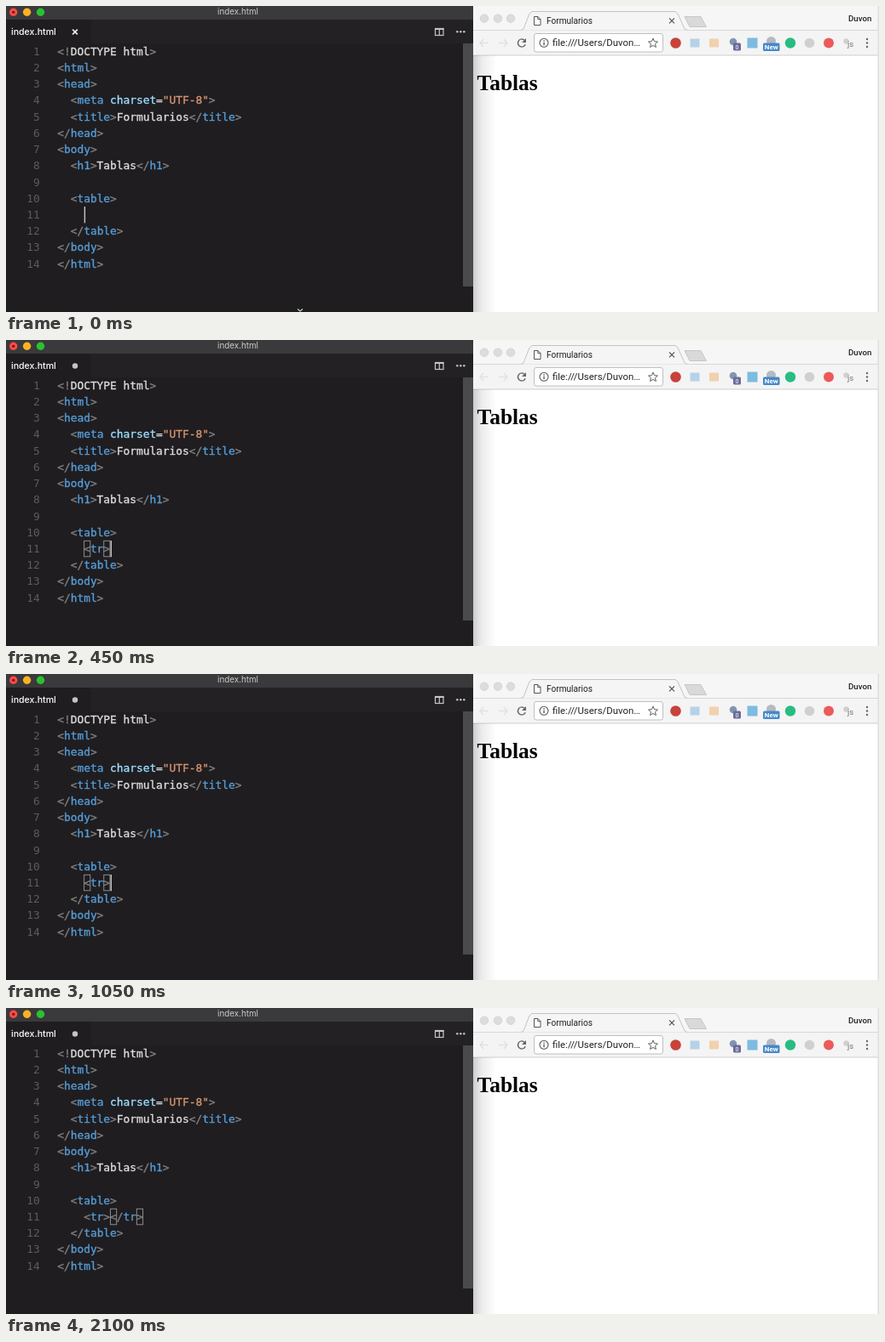
Recreate the animation shown at these times as an HTML page with a canvas. Size 1024x360 px, loop 2.2 s.

```html
<!DOCTYPE html>
<html lang="es">
<head>
<meta charset="UTF-8">
<title>Tablas</title>
<style>
html, body { margin: 0; width: 100%; height: 100%; overflow: hidden; background: #1f1d20; }
canvas { display: block; width: 1024px; height: 360px; }
</style>
</head>
<body>
<canvas id="stage"></canvas>
<script>
const W = 1024, H = 360, LOOP = 2200;
const canvas = document.getElementById('stage');
const ctx = canvas.getContext('2d');
const dpr = window.devicePixelRatio || 1;
canvas.width = W * dpr;
canvas.height = H * dpr;

const MONO = '12.83px "DejaVu Sans Mono", monospace';
const CODE_X = 60.3, CELL = 7.72, ROW = 19.23, FIRST_ROW = 53;
const C = {
  editor: '#1f1d20', bar: '#232124', title: '#3a393b', text: '#dcdcdc',
  bracket: '#808080', tag: '#569cd6', attr: '#9cdcfe', string: '#d3936f',
  number: '#5c5b5d', popup: '#2b292c', chosen: '#073253', ink: '#222222'
};

const LINES = [
  '<!DOCTYPE html>', '<html>', '<head>', '  <meta charset="UTF-8">',
  '  <title>Formularios</title>', '</head>', '<body>', '  <h1>Tablas</h1>',
  '', '  <table>', '', '  </table>', '</body>', '</html>'
];
const EDIT = 10;

const TAGS = ['a', 'abbr', 'address', 'area', 'article'];
// Each step holds until the next one starts.
const STEPS = [
  { at: 0, typed: '', caret: true },
  { at: 100, typed: '<', caret: true, list: ['/table', ...TAGS] },
  { at: 200, typed: '<t', caret: true },
  { at: 250, typed: '<tr', caret: true, list: ['tr', 'track', 'textarea'], match: 'tr',
    note: 'The tr element represents a row of cells in a table.' },
  { at: 400, typed: '<tr>', caret: true, pair: [4, 7] },
  { at: 1200, typed: '<tr><', caret: true },
  { at: 1250, typed: '<tr><', caret: true, list: ['/tr', ...TAGS] },
  { at: 1550, typed: '<tr></tr>', pair: [8, 12] }
];

const colX = col => CODE_X + col * CELL;
const rowY = row => FIRST_ROW + row * ROW;

function rect(x, y, w, h, fill) {
  ctx.fillStyle = fill;
  ctx.fillRect(x, y, w, h);
}

function disc(x, y, r, fill) {
  ctx.fillStyle = fill;
  ctx.beginPath();
  ctx.arc(x, y, r, 0, Math.PI * 2);
  ctx.fill();
}

function ring(x, y, r, color, width = 1) {
  ctx.strokeStyle = color;
  ctx.lineWidth = width;
  ctx.beginPath();
  ctx.arc(x, y, r, 0, Math.PI * 2);
  ctx.stroke();
}

function box(x, y, w, h, color, width = 1) {
  ctx.strokeStyle = color;
  ctx.lineWidth = width;
  ctx.strokeRect(x, y, w, h);
}

function trace(points, closed) {
  ctx.beginPath();
  points.forEach(([x, y]) => ctx.lineTo(x, y));
  if (closed) ctx.closePath();
}

function line(points, color, width = 1) {
  ctx.strokeStyle = color;
  ctx.lineWidth = width;
  trace(points);
  ctx.stroke();
}

function shape(points, fill, stroke) {
  trace(points, true);
  if (fill) { ctx.fillStyle = fill; ctx.fill(); }
  if (stroke) { ctx.strokeStyle = stroke; ctx.lineWidth = 1; ctx.stroke(); }
}

function rounded(x, y, w, h, r, fill, stroke) {
  ctx.beginPath();
  ctx.roundRect(x, y, w, h, r);
  if (fill) { ctx.fillStyle = fill; ctx.fill(); }
  if (stroke) { ctx.strokeStyle = stroke; ctx.lineWidth = 1; ctx.stroke(); }
}

function label(str, x, y, font, color, align = 'left') {
  ctx.font = font;
  ctx.fillStyle = color;
  ctx.textAlign = align;
  ctx.fillText(str, x, y);
}

// Code glyphs get a hairline outline for a slightly heavier weight.
function code(str, x, y, color) {
  label(str, x, y, MONO, color);
  ctx.strokeStyle = color;
  ctx.lineWidth = 0.35;
  ctx.strokeText(str, x, y);
}

function cross(x, y, r, color, width) {
  line([[x - r, y - r], [x + r, y + r]], color, width);
  line([[x - r, y + r], [x + r, y - r]], color, width);
}

function codeLine(str, y) {
  const parts = /(<!|<\/?(?=\w)|>)|("[^"]*")|(charset)|((?<=<\/?)\w+)|./g;
  for (const m of str.matchAll(parts)) {
    const color = m[1] ? C.bracket : m[2] ? C.string : m[3] ? C.attr : m[4] ? C.tag : C.text;
    code(m[0], colX(m.index), y, color);
  }
}

function wrench(x, y) {
  ctx.lineCap = 'round';
  line([[x - 5, y + 4.5], [x + 1.5, y - 1]], '#c5c5c5', 3);
  ctx.lineCap = 'butt';
  ctx.strokeStyle = '#c5c5c5';
  ctx.lineWidth = 2.4;
  ctx.beginPath();
  ctx.arc(x + 3, y - 2.3, 2.9, -0.1, Math.PI * 1.6);
  ctx.stroke();
}

function popup(step, left) {
  const { list, note, match = '' } = step;
  const top = 256, width = 352;
  const height = (list.length + (note ? 1 : 0)) * ROW + 1;
  rect(left, top, width, height, C.popup);
  rect(left, top, width, note ? 38.5 : 19.5, C.chosen);
  box(left + 0.5, top - 0.5, width - 1, height, '#39373b');
  list.forEach((word, i) => {
    const y = 266 + (i + (note && i ? 1 : 0)) * ROW;
    wrench(left + 11, y);
    let k = 0;
    [...word].forEach((ch, j) => {
      const hit = ch === match[k];
      if (hit) k++;
      code(ch, left + 21.5 + j * CELL, y + 4.5, hit ? '#2f94dc' : C.text);
    });
  });
  if (note) {
    label(note, left + 22, 289.9, '500 12.6px Inter, sans-serif', '#c9d2d9');
    disc(left + 334, 285.5, 5, '#326f9c');
    rect(left + 333.4, 284.5, 1.3, 4, '#a9c4d6');
    rect(left + 333.4, 282, 1.3, 1.4, '#a9c4d6');
  }
}

function editor(step, t) {
  rect(0, 0, 548, H, C.editor);
  rect(0, 0, 548, 16, C.title);
  rect(0, 16, 548, 28, C.bar);
  rect(0, 16, 100, 28, C.editor);
  ['#fb4a48', '#fdb224', '#29c231'].forEach((c, i) => disc(8.7 + i * 15.9, 7.2, 4.7, c));
  disc(8.7, 7.2, 1.5, '#6e0d0b');
  label('index.html', 272, 10.3, '9.8px Inter, sans-serif', '#cccccc', 'center');
  label('index.html', 6, 34, '500 10.6px Inter, sans-serif', '#ffffff');
  if (step.typed) disc(81, 30.5, 3.2, '#c4c4c4');
  else cross(81, 30.5, 2.9, '#ededed', 1.6);

  box(503.5, 26.5, 9.5, 8, '#c5c5c5', 1.2);
  rect(503, 26, 10.5, 2, '#c5c5c5');
  rect(507.7, 27, 1.2, 8, '#c5c5c5');
  [529.3, 533.3, 537.3].forEach(x => disc(x, 30.3, 1.2, '#c5c5c5'));
  rect(536, 44, 12, 286, '#4a494b');

  LINES.forEach((str, i) => {
    const y = rowY(i) + 4.7;
    label(i + 1, 39.7, y, MONO, C.number, 'right');
    codeLine(i === EDIT ? '    ' + step.typed : str, y);
  });

  const y = rowY(EDIT);
  (step.pair || []).forEach(col => box(colX(col) + 0.4, y - 9, CELL - 0.5, 18.5, '#8c8c8c'));
  const end = colX(4 + step.typed.length);
  if (step.caret) rect(end + 0.5, y - 9.3, 1.4, 19.3, '#c8c8c8');
  if (step.list) popup(step, Math.round(end - 0.5));
  if (t < 100) line([[342, 356.5], [345, 359], [348, 356.5]], '#d0d0d0', 1.2);
}

function star(x, y, r) {
  const points = Array.from({ length: 10 }, (_, i) => {
    const a = -Math.PI / 2 + i * Math.PI / 5, d = i % 2 ? r * 0.45 : r;
    return [x + d * Math.cos(a), y + d * Math.sin(a)];
  });
  shape(points, null, '#606060');
}

function arrow(x, y, dir) {
  line([[x - 5 * dir, y], [x + 5 * dir, y]], '#e0e0e0', 1.4);
  line([[x + dir, y - 4.5], [x + 5 * dir, y], [x + dir, y + 4.5]], '#e0e0e0', 1.4);
}

function extensions() {
  const y = 43.5;
  disc(785.5, y, 6.3, '#c94239');
  rect(802.5, 38.5, 11, 10, '#b5d2e8');
  rect(825, 38.5, 11, 10, '#f3d0ae');
  disc(853, 42, 4.3, '#8195b0');
  rounded(853, 43.5, 9, 9, 1.5, '#6d6a9c');
  label('0', 857.5, 50.8, '7px Roboto, sans-serif', '#ffffff', 'center');
  rect(869.5, 37.5, 12, 12, '#7dbbe0');
  disc(897.5, 41.5, 5.5, '#b4bac0');
  rounded(888, 43.5, 19.5, 9.5, 1.5, '#4688c8');
  label('New', 897.7, 51.2, 'bold 8px Roboto, sans-serif', '#ffffff', 'center');
  disc(920, y, 6.2, '#27bd82');
  disc(942.5, y, 5.8, '#d0d0d0');
  disc(965, y, 6, '#ec5a5a');
  disc(985.5, 41.5, 3.2, '#d0d0d0');
  label('js', 987, 48, '9.5px Roboto, sans-serif', '#777777');
  [39, 43.5, 48].forEach(cy => disc(1010, cy, 1.2, '#666666'));
}

function browser() {
  rect(548, 0, 476, H, '#ffffff');
  rect(548, 0, 476, 29, '#f6f6f6');
  rect(548, 28, 476, 30, '#f4f4f4');
  rect(548, 28, 476, 1, '#d8d8d8');
  [561, 577, 592].forEach(x => {
    disc(x, 14.7, 4.8, '#dcdcdc');
    ring(x, 14.7, 4.8, '#cfcfcf', 0.7);
  });

  const tab = [[604, 28.5], [607, 27], [614, 9], [617, 6.5], [785, 6.5], [788, 9], [796, 27], [799, 28.5]];
  shape(tab, '#f5f5f5');
  line(tab, '#c4c4c4');
  shape([[796, 12.5], [815, 12.5], [821.5, 24.5], [802, 24.5]], '#d9d9d9', '#c6c6c6');
  shape([[619.5, 12.5], [624, 12.5], [627, 15.5], [627, 22.5], [619.5, 22.5]], '#ffffff', '#555555');
  line([[623.8, 12.5], [623.8, 15.7], [627, 15.7]], '#555555');
  label('Formularios', 634, 21.2, '10.1px Roboto, sans-serif', C.ink);
  cross(781, 17.4, 3, '#555555', 1.3);
  label('Duvon', 988, 18.4, '500 9.7px Roboto, sans-serif', C.ink);

  arrow(561, 43.5, -1);
  arrow(583, 43.5, 1);
  ctx.strokeStyle = '#666666';
  ctx.lineWidth = 1.5;
  ctx.beginPath();
  ctx.arc(605, 43.5, 4.5, 0.4, Math.PI * 1.75);
  ctx.stroke();
  shape([[610, 38], [610, 43], [605, 43]], '#666666');

  rounded(619.5, 32.5, 151, 21.5, 2.5, '#ffffff', '#bfbfbf');
  ring(631, 43.3, 5, '#555555', 1.1);
  rect(630.4, 42.5, 1.3, 3.7, '#555555');
  rect(630.4, 40.2, 1.3, 1.4, '#555555');
  label('file:///Users/Duvon…', 641, 47.3, '11.4px Roboto, sans-serif', C.ink);
  star(759, 43.8, 5.8);
  extensions();
  rect(548, 57.5, 476, 1, '#cfcfcf');

  const shade = ctx.createLinearGradient(548, 0, 575, 0);
  shade.addColorStop(0, 'rgba(0,0,0,0.2)');
  shade.addColorStop(0.35, 'rgba(0,0,0,0.08)');
  shade.addColorStop(1, 'rgba(0,0,0,0)');
  rect(548, 58, 27, H - 58, shade);
  rect(1022.5, 0, 1.5, H, '#dedede');
  label('Tablas', 552.6, 98.8, 'bold 25.4px "Liberation Serif", serif', '#000000');
}

function draw(t) {
  ctx.setTransform(dpr, 0, 0, dpr, 0, 0);
  const step = STEPS.filter(s => s.at <= t).pop();
  editor(step, t);
  browser();
}

const start = performance.now();
function tick() {
  draw((performance.now() - start) % LOOP);
  requestAnimationFrame(tick);
}
tick();
</script>
</body>
</html>
```
